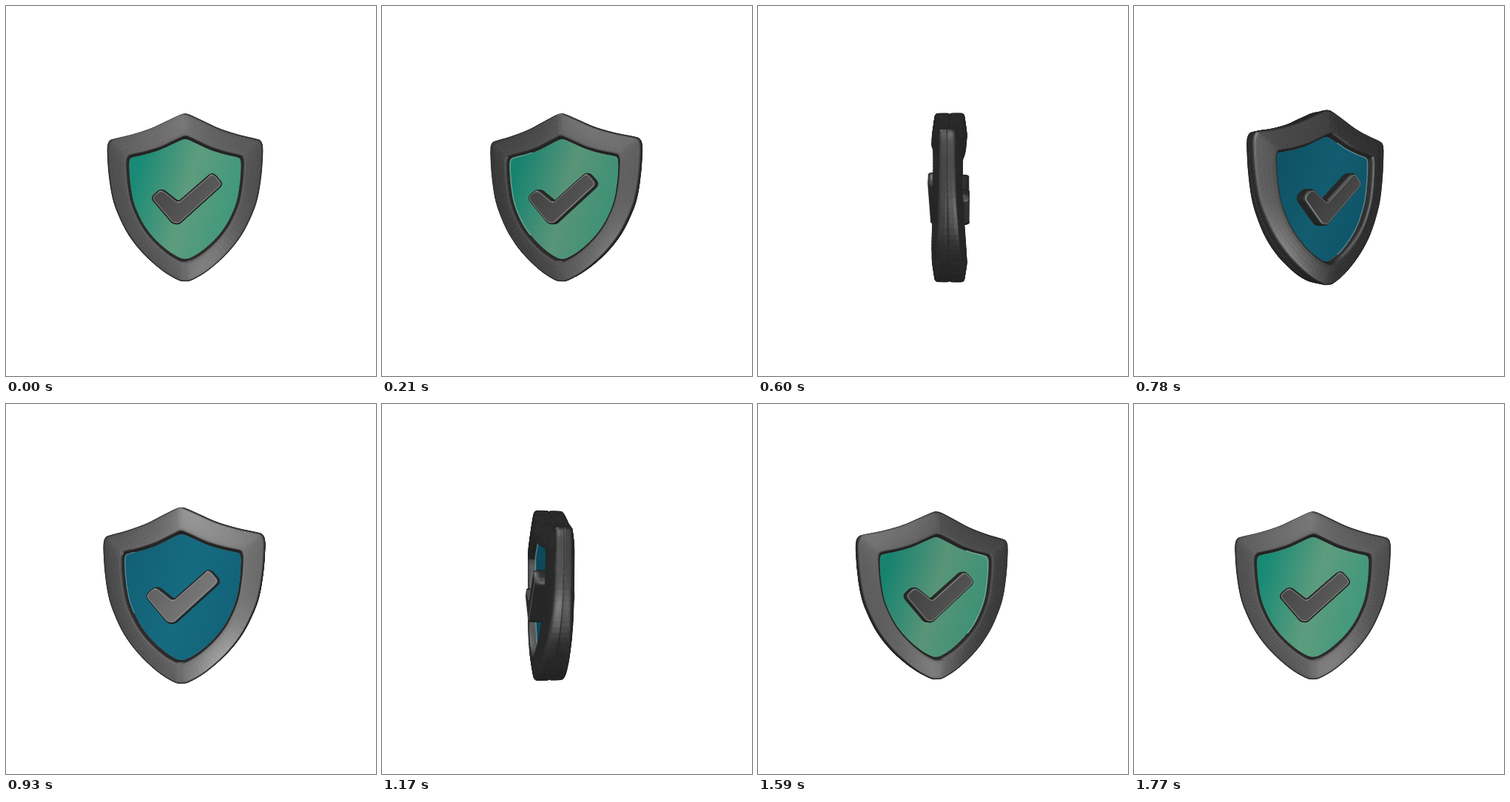
Write an HTML page with a canvas that moves like this. It is 500 by 500 pixels and loops after 1.8 s.

```html
<!DOCTYPE html>
<html lang="en">
<head>
<meta charset="utf-8">
<title>Turning shield</title>
<style>
html, body { margin: 0; width: 100%; height: 100%; overflow: hidden; background: #fff; }
canvas { display: block; width: 500px; height: 500px; }
</style>
</head>
<body>
<canvas id="stage" width="500" height="500"></canvas>
<script>
const ctx = document.getElementById('stage').getContext('2d');
const LOOP = 1800, STEP = 30;
const CX = 242, CY = 259, CAM = 700;
const MID = -17;        // shield centre lies behind the turning axis
const SIZE = 1.013, FLOOR = 9, TOP = 26;

const spline = (a, b, c, d, t) => b.map((_, i) => 0.5 * (2 * b[i] + (c[i] - a[i]) * t +
  (2 * a[i] - 5 * b[i] + 4 * c[i] - d[i]) * t * t + (3 * b[i] - a[i] - 3 * c[i] + d[i]) * t ** 3));

function smooth(pts, steps, closed) {
  const n = pts.length, out = [];
  const at = i => closed ? pts[(i + n) % n] : pts[Math.max(0, Math.min(n - 1, i))];
  for (let i = 0; i < (closed ? n : n - 1); i++)
    for (let k = 0; k < steps; k++)
      out.push(spline(at(i - 1), at(i), at(i + 1), at(i + 2), k / steps));
  if (!closed) out.push(pts[n - 1]);
  return out;
}

function roundCorners(pts) {
  const out = [], n = pts.length;
  const toward = (a, b, r) => {
    const l = Math.hypot(b[0] - a[0], b[1] - a[1]);
    return [a[0] + (b[0] - a[0]) * r / l, a[1] + (b[1] - a[1]) * r / l];
  };
  pts.forEach((v, i) => {
    const a = toward(v, pts[(i + n - 1) % n], v[2]), b = toward(v, pts[(i + 1) % n], v[2]);
    for (let k = 0; k <= 6; k++) {
      const t = k / 6, u = 1 - t;
      out.push([0, 1].map(j => u * u * a[j] + 2 * u * t * v[j] + t * t * b[j]));
    }
  });
  return out;
}

function inset(pts, d) {
  const n = pts.length;
  return pts.map((p, i) => {
    const a = pts[(i + n - 1) % n], b = pts[(i + 1) % n];
    const tx = b[0] - a[0], ty = b[1] - a[1], l = Math.hypot(tx, ty) || 1;
    return [p[0] - ty / l * d, p[1] + tx / l * d];
  });
}

// Right half of the shield from the peak to the tip
const half = [[0, -112], [7, -110.3], [24, -102.5], [46, -92.5], [72, -84.5], [96, -79.3], [102.5, -76.5],
  [105, -69], [105, -56], [103, -30], [98, 0], [90, 23], [76, 50], [56, 75], [31, 97], [10, 109.5], [0, 111.5]];
const left = half.slice(1, -1).reverse().map(([x, y]) => [-x, y]);
const outline = smooth(half.concat(left), 4, true);

// The shield bows: it is thinner toward its left and right edges
function ringAt([k, z]) {
  return outline.map(([x, y]) => {
    const thin = 10 * (x * k / 105) ** 2 * Math.min(1, z / 12);
    return [x * k * SIZE, (y * k + (1 - k) * 7) * SIZE, z - thin];
  });
}

// Frame cross-section: scale of the outline, height
const profile = smooth([[0.985, 0], [1, 2], [1.001, 12], [0.998, 17], [0.985, 19], [0.96, 19.8],
  [0.86, 21.6], [0.77, 22.9], [0.748, 22.4], [0.734, 19.5], [0.722, 12]], 2, false);
const mark = roundCorners([[-47, 0, 8], [-32, -13, 8], [-9, 5, 3], [37, -35, 8], [52, -18, 8], [-8, 36, 4], [-17, 35, 4]]);
const markRings = [[0, FLOOR], [0, 20], [0.4, 23], [1.2, 25.2], [2.2, TOP]]
  .map(([d, z]) => inset(mark, d).map(([x, y]) => [x, y, z]));

const place = s => ([x, y, z]) => [s * x, y, MID + s * z];

function mesh(rings, s) {
  const quads = [], put = place(s);
  const pts = rings.map(r => r.map(put));
  for (let j = 0; j + 1 < pts.length; j++)
    for (let i = 0, n = pts[j].length; i < n; i++) {
      const a = pts[j][i], b = pts[j][(i + 1) % n], c = pts[j + 1][(i + 1) % n], d = pts[j + 1][i];
      const u = [0, 1, 2].map(k => b[k] + c[k] - a[k] - d[k]);
      const v = [0, 1, 2].map(k => c[k] + d[k] - a[k] - b[k]);
      const m = [u[1] * v[2] - u[2] * v[1], u[2] * v[0] - u[0] * v[2], u[0] * v[1] - u[1] * v[0]];
      const l = Math.hypot(...m) || 1;
      quads.push({ s, p: [a, b, c, d], n: m.map(e => e / l),
        o: [0, 1, 2].map(k => (a[k] + b[k] + c[k] + d[k]) / 4) });
    }
  return quads;
}

const rings = profile.map(ringAt);
const frame = mesh(rings, 1).concat(mesh(rings, -1));
const sides = [1, -1].map(s => ({
  s,
  panel: ringAt([0.724, 12]).map(place(s)),
  mark: mesh(markRings, s),
  cap: markRings[markRings.length - 1].map(place(s)),
  tint: s > 0 ? [[24, 138, 117], [94, 156, 126], [62, 152, 124]] : [[18, 98, 121], [22, 108, 130], [18, 99, 122]],
  dim: s > 0 ? 0.62 : 0.74
}));

let sin = 0, cos = 1;
const turn = ([x, y, z]) => [x * cos - z * sin, y, x * sin + z * cos];
function project(p) {
  const [x, y, d] = turn(p), k = CAM / (CAM - d);
  return [CX + x * k, CY + y * k];
}
const faces = (n, p) => n[2] * (CAM - p[2]) - n[0] * p[0] - n[1] * p[1] > 0;

function trace(pts) {
  ctx.beginPath();
  pts.forEach(p => ctx.lineTo(...project(p)));
  ctx.closePath();
}

const grey = v => { v = Math.round(Math.min(245, v)); return `rgb(${v},${v},${v})`; };

// Nearby lights: the reflection shifts with the place as well as the normal
function metal(n, o, s) {
  const m = [n[0] + o[0] * 0.0015, n[1] + o[1] * 0.002, n[2]];
  const len = Math.hypot(...m);
  const lobe = (x, y, z, e) => Math.max(0, (m[0] * x + m[1] * y + m[2] * z) / len) ** e;
  const gain = 32 + (s > 0 ? 22 : 40) * Math.max(0, s * cos);
  const shine = s > 0 ? 0.65 : 1;
  return 40 + gain * Math.max(0, n[2]) ** 6 +
    shine * (66 * lobe(0.2, 0.36, 0.91, 40) + 40 * lobe(-0.05, -0.37, 0.93, 40)) +
    85 * lobe(-0.2, -0.66, 0.72, 60) - 10 * Math.max(0, n[1]) ** 2;
}

function prepare(quads) {
  const out = [];
  for (const q of quads) {
    const n = turn(q.n), o = turn(q.o);
    if (faces(n, o)) out.push({ q, n, o });
  }
  return out.sort((a, b) => a.o[2] - b.o[2]);
}

function paint(list) {
  ctx.lineWidth = 0.7;
  for (const { q, n, o } of list) {
    ctx.fillStyle = ctx.strokeStyle = grey(metal(n, o, q.s));
    trace(q.p);
    ctx.fill();
    ctx.stroke();
  }
}

function blend(from, to, stops) {
  const g = ctx.createLinearGradient(...project(from), ...project(to));
  stops.forEach(([at, c]) => g.addColorStop(at, c));
  return g;
}

function drawSide({ s, panel, mark, cap, tint, dim }) {
  const put = place(s), face = Math.max(0, s * cos);
  const shown = z => faces([-s * sin, 0, s * cos], turn(put([0, 0, z])));
  if (shown(FLOOR)) {
    const m = dim + (1 - dim) * face ** 4;
    const [a, b, c] = tint.map(t => `rgb(${t.map(v => Math.round(v * m)).join()})`);
    trace(panel);
    ctx.fillStyle = blend(put([-72, -20, FLOOR]), put([72, 20, FLOOR]), [[0, a], [0.5, b], [1, c]]);
    ctx.fill();
    ctx.strokeStyle = s > 0 ? 'rgba(165,222,198,.5)' : 'rgba(150,195,208,.45)';
    ctx.lineWidth = 1.6;
    ctx.stroke();
  }

  paint(prepare(mark));
  if (!shown(TOP)) return;
  const v = 40 + (s > 0 ? 40 : 72) * face ** 5;
  trace(cap);
  ctx.fillStyle = blend(put([-40, -20, TOP]), put([30, 25, TOP]), [[0, grey(v * 0.88)], [1, grey(v * 1.15)]]);
  ctx.fill();
  ctx.strokeStyle = `rgba(225,225,225,${0.2 + 0.3 * face})`;
  ctx.lineWidth = 0.9;
  ctx.stroke();
}

function angle(t) {
  const p = t / LOOP;
  return Math.PI * (0.9 * (1 - Math.cos(Math.PI * p)) + 0.2 * p);
}

function draw(t) {
  const a = angle(t);
  sin = Math.sin(a);
  cos = Math.cos(a);
  ctx.fillStyle = '#fff';
  ctx.fillRect(0, 0, 500, 500);
  ctx.lineJoin = 'round';
  const quads = prepare(frame);
  const pivot = MID * cos;
  paint(quads.filter(e => e.o[2] < pivot));
  [...sides].sort((p, q) => (p.s - q.s) * cos).forEach(drawSide);
  paint(quads.filter(e => e.o[2] >= pivot));
}

const start = performance.now();
function loop() {
  const t = (performance.now() - start) % LOOP;
  draw(Math.floor(t / STEP) * STEP);
  requestAnimationFrame(loop);
}
loop();
</script>
</body>
</html>
```
